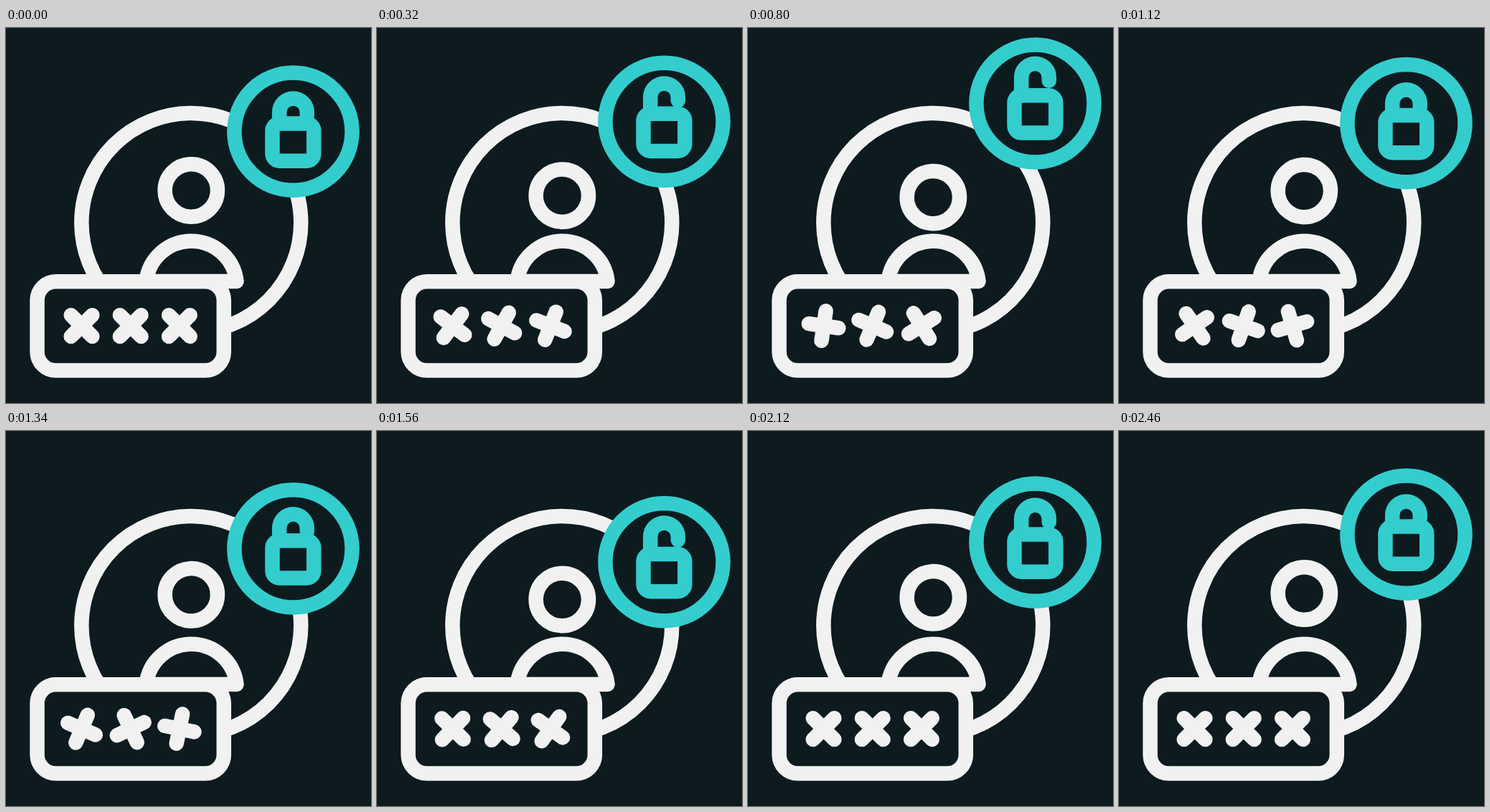
Write an HTML page that moves like this. It is 509 by 524 pixels and loops after 2.62 s.

```html
<!DOCTYPE html>
<html lang="en">
<head>
<meta charset="utf-8">
<title>Secure login</title>
<style>
  html, body { margin: 0; width: 100%; height: 100%; overflow: hidden; background: #0d1b1f; }
  svg { display: block; width: 509px; height: 524px; }
  .line { fill: none; stroke: #f1f1f1; stroke-width: 20.5; stroke-linecap: round; stroke-linejoin: round; }
  .teal { stroke: #33cdce; }
  .solid { fill: #0d1b1f; }
</style>
</head>
<body>
<svg viewBox="0 0 509 524">
  <g class="line">
    <circle cx="258.3" cy="272" r="153"/>
    <circle id="head" cx="258.3" cy="227" r="36.7"/>
    <path d="M195.5 354A63.4 63.4 0 0 1 321.5 354Z"/>
    <rect class="solid" x="43.5" y="354.3" width="260.3" height="124.2" rx="26"/>
    <path class="cross" d="M-21 0H21M0-21V21"/>
    <path class="cross" d="M-21 0H21M0-21V21"/>
    <path class="cross" d="M-21 0H21M0-21V21"/>
  </g>
  <g id="badge" class="line teal">
    <circle class="solid" cx="400.5" cy="144.7" r="82.1"/>
    <path id="shackle" d="M381.2 146V117.7A19.3 19.3 0 0 1 419.8 117.7V122.5"/>
    <rect class="solid" x="371.5" y="133.5" width="57.8" height="52.3" rx="10"/>
  </g>
</svg>
<script>
const LOOP = 2620;
const head = document.getElementById('head');
const badge = document.getElementById('badge');
const shackle = document.getElementById('shackle');
const crosses = document.querySelectorAll('.cross');

const spinTimes = [0, 320, 800, 1120, 1340, 1620];
const spins = [
  [0, -8, 143, 280, 338, 360],
  [0, -16.5, 68, 154, 289, 360],
  [0, -23.5, 13, 118, 236, 360]
];

const smooth = p => p * p * (3 - 2 * p);

// Eased moves between values spaced evenly in time, then hold
function steps(t, span, values) {
  const i = Math.floor(t / span);
  if (i >= values.length - 1) return values[values.length - 1];
  return values[i] + (values[i + 1] - values[i]) * smooth(t / span - i);
}

// Smooth curve through keys, at rest on both ends
function spline(t, times, values) {
  const last = times.length - 1;
  if (t >= times[last]) return values[last];
  const i = times.findIndex(x => x > t) - 1;
  const slope = k => k === 0 || k === last ? 0
    : (values[k + 1] - values[k - 1]) / (times[k + 1] - times[k - 1]);
  const span = times[i + 1] - times[i];
  const p = (t - times[i]) / span, q = 1 - p;
  return values[i] + (values[i + 1] - values[i]) * smooth(p)
    + span * p * q * (q * slope(i) - p * slope(i + 1));
}

function draw(now) {
  const t = now % LOOP;
  const nod = steps(t, 600, [0, 13, 0, 13, 0]);
  const lift = steps(t, 800, [0, -39.2, 39, 0]);
  head.setAttribute('transform', `translate(0 ${nod})`);
  shackle.setAttribute('transform', `translate(0 ${-nod})`);
  badge.setAttribute('transform', `translate(0 ${lift})`);
  crosses.forEach((cross, i) => {
    const angle = 45 + spline(t, spinTimes, spins[i]);
    cross.setAttribute('transform', `translate(${105.5 + 68.2 * i} 416.2) rotate(${angle})`);
  });
  requestAnimationFrame(() => draw(performance.now()));
}
draw(performance.now());
</script>
</body>
</html>
```
